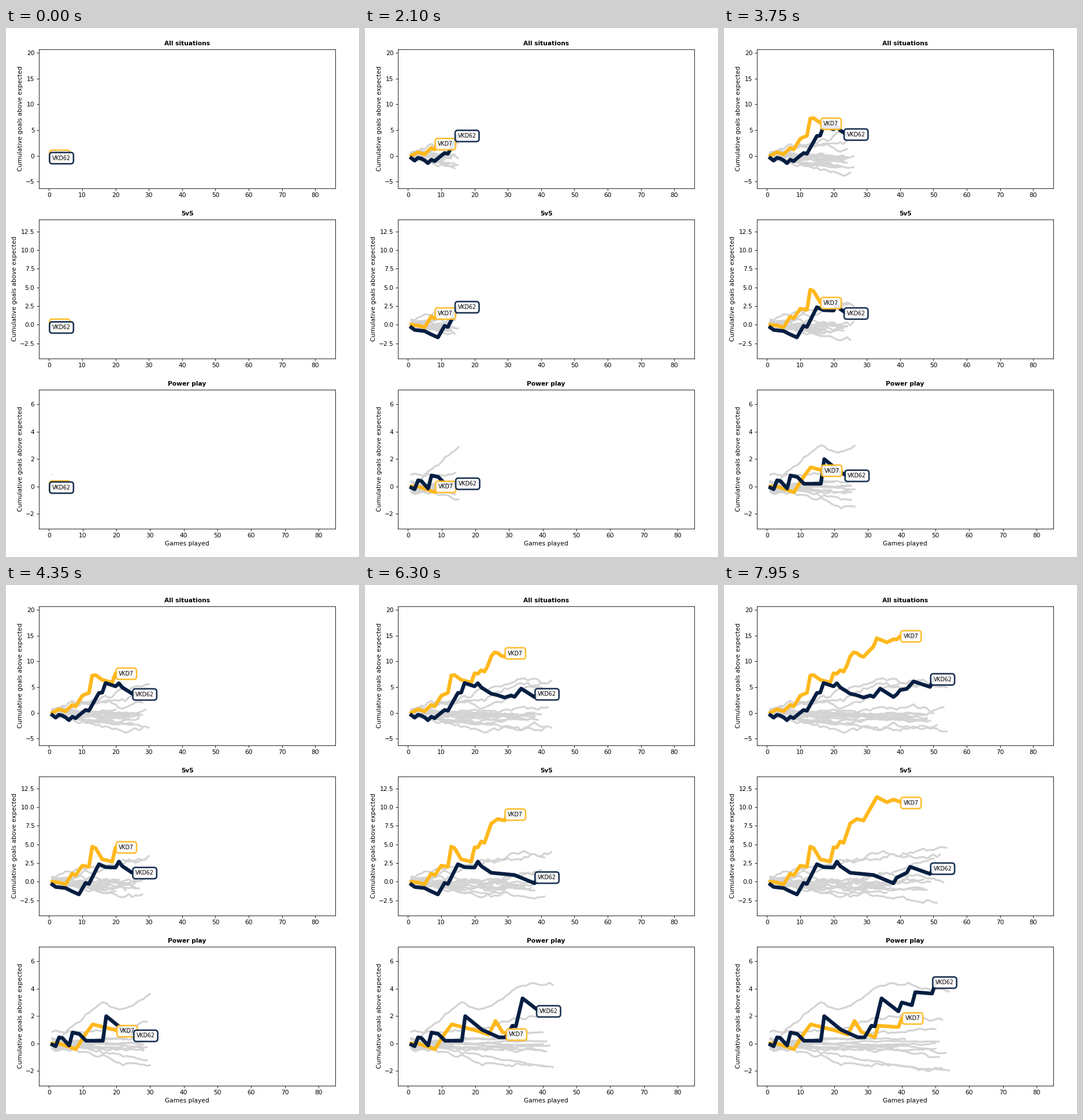
Write a matplotlib script that moves like this. It is 611 by 917 pixels and loops after 8000 ms.

```python
import numpy as np
import matplotlib.pyplot as plt
from matplotlib.animation import FuncAnimation

W, H = 611, 917
DPI = W / 8
STEPS, HOLD = 54, 3          # one more team game every third tick of 50 ms
GOLD, NAVY, GREY = "#FFB81C", "#041E42", "lightgray"
GAMES = np.arange(1, STEPS + 1)

plt.rcParams["font.family"] = "DejaVu Sans"
fig = plt.figure(figsize=(8, (H + 1e-3) / DPI), dpi=DPI, facecolor="white")


def panel(title, top, xlim, ylim, yticks):
    ax = fig.add_axes([56.8 / W, 1 - (top + 241) / H, 513.4 / W, 241 / H])
    ax.set_title(title, fontsize=10, fontweight="bold")
    ax.set_ylabel("Cumulative goals above expected")
    ax.set(xlim=xlim, ylim=ylim, yticks=yticks, xticks=range(0, 81, 10))
    return ax


total = panel("All situations", 36.6, (-3.05, 86.05), (-6.29, 20.75), range(-5, 21, 5))
even = panel("5v5", 331.6, (-3.05, 86.05), (-4.5, 14.12), np.arange(-2.5, 13, 2.5))
power = panel("Power play", 626.6, (-3, 85), (-3.07, 7.09), range(-2, 7, 2))
power.set_xlabel("Games played")

rng = np.random.default_rng(4)
tracks = []


def curve(*points):
    return np.interp(GAMES, *zip(*points))


def wander(size, pull=0.25):
    """A random walk that is drawn back to zero."""
    walk = np.zeros(STEPS)
    for i in range(1, STEPS):
        walk[i] = (1 - pull) * walk[i - 1] + rng.normal(0, size)
    return walk


def add_track(ax, values, played, color=GREY, width=3, name=""):
    line, = ax.plot([], [], color=color, lw=width)
    label = name and ax.text(0, 0, name, fontsize=9, va="center", bbox=dict(
        boxstyle="round,pad=0.5", fc="white", ec=color, lw=2.5, alpha=0.9))
    tracks.append((line, label, values, played))


def add_grey(ax, values, last):
    add_track(ax, values, np.maximum(1, np.rint(GAMES * last / STEPS).astype(int)))


def add_stand_outs(ax, size, trends):
    """Teammates away from the pack, by their totals at a few stages of the season."""
    for i, trend in enumerate(trends):
        values = curve(*zip((1, 16, 22, 36, 52), trend)) + wander(size)
        add_grey(ax, values, STEPS - 2 * i % 5)


def add_pack(ax, size, levels):
    """Teammates who settle around steady levels."""
    for level in levels:
        start = rng.uniform(-0.4, 0.6) - level
        values = level + start * np.exp(-GAMES / 8) + wander(size, 0.15)
        add_grey(ax, values, rng.integers(36, 53))


def add_star(name, color, absences, in_even, in_power, elsewhere):
    played = np.array([g - sum(a < g for a in absences) for g in GAMES])
    for ax, values in ((total, in_even + in_power + elsewhere), (even, in_even), (power, in_power)):
        add_track(ax, values, played, color, 6, name)


add_pack(total, 0.18, np.linspace(-0.1, -1.5, 10))
add_stand_outs(total, 0.25, [
    (.2, 3, 4.3, 6.4, 5.3), (.7, 2.2, 2.8, 5.8, 5.8), (.5, 1.8, 1.4, 4.6, 5.4),
    (0, -.6, -.3, 1, 1.1), (-.3, -2.3, -3.9, -2.9, -2.4), (-.5, -2, -2.3, -2.9, -3.3)])

add_pack(even, 0.15, np.linspace(0.2, -1.2, 10))
add_stand_outs(even, 0.2, [
    (.7, 2.1, 2.4, 3.6, 4.4), (.2, 1.9, 2.1, 3, 3.3), (.5, 0, .1, .9, 3),
    (0, -.3, -.2, 1, .2), (-.3, -1.6, -2, -2, -2.6)])

add_pack(power, 0.03, np.linspace(0.3, -0.4, 5))
add_stand_outs(power, 0.07, [
    (0, 3.1, 2.5, 4.5, 3.85), (.86, 1, 1.3, 1.9, 1.9), (.3, .4, .3, .9, 1.2),
    (-.1, 0, -.1, -.1, -.6), (-.3, -.5, -.5, -.45, -1.05),
    (-.4, -.9, -1.6, -1.45, -1.95), (-.2, -.5, -.9, -1.5, -1.95)])
power.plot(1, 0.86, "s", color=GREY, ms=2.5, mew=0)

add_star(
    "VKD7", GOLD, [*range(9, 15), 16, 18, 20, 35, 36, 38, 40],
    curve((1, 0), (3, -.1), (5, -.35), (7, 1.1), (8, .85), (10, 2.15), (12, 2), (13, 4.7),
          (14, 4.5), (16, 3), (19, 2.7), (20, 4.6), (21, 4.6), (22, 5.4), (23, 5.2), (25, 7.8),
          (27, 8.4), (29, 8.2), (33, 11.35), (36, 10.65), (38, 11), (41, 10.55)),
    curve((1, 0), (3, 0), (8, -.42), (11, .75), (13, 1.4), (21, .9), (24, .65), (26, 1.65),
          (28, .85), (32, .45), (33, 1.3), (39, 1.2), (40, 1.83)),
    curve((1, 0), (3, .8), (12, .8), (16, 2.2), (36, 1.8), (41, 2.5)))

add_star(
    "VKD62", NAVY, [23, 25, 27, 29],
    curve((1, -.37), (2, -.7), (5, -.85), (7, -1.3), (9, -1.7), (11, -.15), (12, -.3),
          (15, 2.35), (17, 1.95), (20, 1.9), (21, 2.7), (22, 2.1), (25, 1.2), (32, .9),
          (38, -.2), (39, .55), (42, 1.2), (43, 2), (49, 1.05), (50, 1.75)),
    curve((1, -.08), (2, -.2), (3, .45), (4, .4), (6, -.15), (7, .8), (9, .7), (11, .2),
          (16, .2), (17, 2), (22, 1), (27, .45), (29, .45), (31, 1.3), (32, 1.25), (34, 3.3),
          (39, 2.35), (40, 3), (43, 2.8), (44, 3.75), (49, 3.65), (50, 4.45)),
    curve((1, 0), (8, -.3), (9, .5), (12, .5), (17, 1.85), (27, 1.85), (32, .95), (50, .3)))


def update(tick):
    step = tick // HOLD
    for line, label, values, played in tracks:
        n = played[step]
        line.set_data(GAMES[:n], values[:n])
        if label:
            label.set_position((n, values[n - 1]))
    return [track[0] for track in tracks]


anim = FuncAnimation(fig, update, frames=160, interval=50, repeat=True, repeat_delay=0,
                     init_func=lambda: update(0), blit=False)
plt.show()
```
